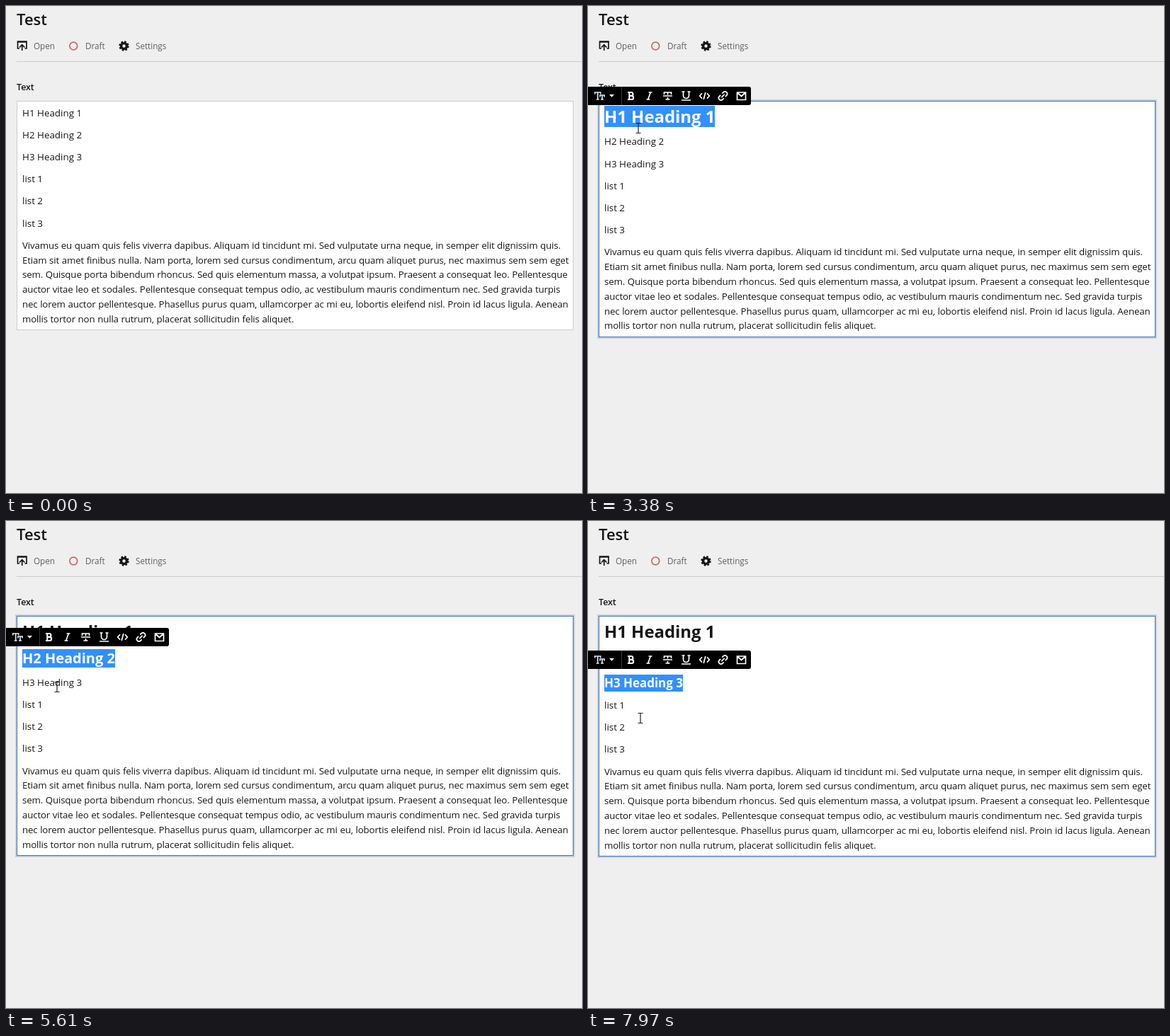
Write an HTML page that moves like this. It is 813x688 px and loops after 8000 ms.

```html
<!DOCTYPE html>
<html lang="en">
<head>
<meta charset="utf-8">
<title>Text editor</title>
<style>
html, body { margin: 0; width: 100%; height: 100%; overflow: hidden; background: #efefef; }
body { position: relative; color: #161616; font: 13.4px/20.8px "Open Sans", "Noto Sans", sans-serif; }
body > * { position: absolute; }
svg { display: block; overflow: visible; fill: none; stroke: #161616; stroke-width: 1.7; }
.title { left: 15px; top: 3px; font-size: 22px; line-height: 30px; font-weight: 600; }
.btn { top: 46px; font-size: 11.7px; color: #606060; }
.rule { left: 15px; right: 0; top: 78px; height: 1px; background: #ccc; }
.label { left: 15px; top: 105px; font-size: 12.4px; font-weight: 600; }
.box { left: 15px; top: 134px; width: 786px; box-sizing: border-box; padding: 5.7px 7px 4.7px; border: 1px solid #ccc; background: #fff; white-space: pre; }
.box.focus { border-color: #4271ae; box-shadow: 0 0 0 2px rgba(66, 113, 174, .25); }
.box div { margin-bottom: 10.4px; }
.box div span { display: inline-block; vertical-align: top; }
.box p { margin: 0; font-size: 13.3px; letter-spacing: -.15px; word-spacing: .33px; }
.h1 { font-size: 23.9px; line-height: 30.3px; font-weight: 700; }
.h2 { font-size: 20px; line-height: 26px; font-weight: 700; }
.h3 { font-size: 16.95px; line-height: 21.8px; font-weight: 700; }
.sel { background: #3390ff; color: #fff; }
.h3 .sel { margin: -1px 0; padding: 1px 0; }
.bar { left: 0; width: 230px; height: 26px; background: #000; border-radius: 0 3px 3px 0; }
.bar svg { stroke: #fff; }
.bar .solid { fill: #fff; stroke: none; }
.menu { left: 0; width: 110px; height: 135px; background: #fff; border-radius: 0 2px 2px 0; box-shadow: 0 2px 8px rgba(22, 22, 22, .13); }
.menu div { position: absolute; left: 33px; font-size: 11.7px; color: #666; }
.menu div.on { color: #111; }
.menu svg { position: absolute; left: -20px; top: 3px; }
.menu text { font-size: 5.5px; fill: #161616; stroke: none; }
</style>
</head>
<body>
<div class="title">Test</div>
<svg width="240" height="80" style="left:0;top:0">
  <path d="M19 60h-2.500V50H29v10h-2.500M16 51h13M22.700 63v-7M19 58.500l3.700-3.700 3.700 3.700"/>
  <circle cx="95.300" cy="56.500" r="5.400" stroke="#d16464"/>
  <circle cx="166.500" cy="56.500" r="4" stroke-width="3.600"/>
  <circle cx="166.500" cy="56.500" r="6.200" stroke-width="2" stroke-dasharray="2.600 2.270"/>
</svg>
<div class="btn" style="left:39px">Open</div>
<div class="btn" style="left:112px">Draft</div>
<div class="btn" style="left:183px">Settings</div>
<div class="rule"></div>
<div class="label">Text</div>

<div class="box" id="box"><div></div><div></div><div></div><div>list 1</div><div>list 2</div><div>list 3</div><p>Vivamus eu quam quis felis viverra dapibus. Aliquam id tincidunt mi. Sed vulputate urna neque, in semper elit dignissim quis.
Etiam sit amet finibus nulla. Nam porta, lorem sed cursus condimentum, arcu quam aliquet purus, nec maximus sem sem eget
sem. Quisque porta bibendum rhoncus. Sed quis elementum massa, a volutpat ipsum. Praesent a consequat leo. Pellentesque
auctor vitae leo et sodales. Pellentesque consequat tempus odio, ac vestibulum mauris condimentum nec. Sed gravida turpis
nec lorem auctor pellentesque. Phasellus purus quam, ullamcorper ac mi eu, lobortis eleifend nisl. Proin id lacus ligula. Aenean
mollis tortor non nulla rutrum, placerat sollicitudin felis aliquet.</p></div>

<div class="menu" id="menu"></div>

<div class="bar" id="bar">
  <svg width="230" height="26">
    <g id="wand">
      <path d="M10 19.500l7.500-7.500M18.500 11l1.500-1.500" stroke-width="2.400"/>
      <path d="M12 6.500v4M10 8.500h4M22 13v4M20 15h4M21 5.500v3M19.500 7h3" stroke-width="1.300"/>
    </g>
    <path id="style" stroke="#dbe6f2" transform="translate(9 6)"/>
    <path class="solid" d="M30 11h7l-3.500 3.700z"/>
    <path d="M47.500 0v26" stroke="#3a3a3a" stroke-width="1"/>
    <path d="M56 8h5a2.400 2.400 0 0 1 0 4.900H58M58.300 8v10M56 18h5.600a2.500 2.500 0 0 0 0-5.100H58" stroke-width="2.100"/>
    <path d="M85.500 8h5M82.500 18h5M88.300 8l-3.600 10"/>
    <path d="M107.500 11V8h10v3M112.500 8v3.500M112.500 15v3M109.500 18h6M106 13h13"/>
    <path d="M134.500 7v5.500a4 4 0 0 0 8 0V7M132.500 7h4M140.500 7h4M132 19h13"/>
    <path d="M161 9.300l-3.300 3.700 3.300 3.700M168 9.300l3.300 3.700-3.300 3.700M165.800 8l-2.600 10"/>
    <g transform="rotate(-45 190.500 13)">
      <path d="M189 9.800h-2.500a3.200 3.200 0 0 0 0 6.400h2.500M192 9.800h2.500a3.200 3.200 0 0 1 0 6.400h-2.500M187.500 13h6"/>
    </g>
    <path d="M210.500 8h12v10.500h-12zl6 5.500 6-5.500"/>
  </svg>
</div>

<svg id="mouse" width="1" height="1" style="left:0;top:0">
  <circle id="press" cx="-1.500" r="10" fill="#f7ea2c" fill-opacity=".65" stroke="none"/>
  <path id="arrow" d="M0 0v16l3.700-3.500 2.500 6 2.400-1-2.500-5.900h5.200z" fill="#fff" stroke="#000" stroke-width="1"/>
  <path id="beam" d="M-3.500-6.500h7M0-6.500v14M-3.500 7.500h7" stroke="#222" stroke-width="1.200"/>
  <path id="hand" d="M-1 10V1a1.500 1.500 0 0 1 3 0v5.500l7 1.500q1.500.5 1.500 2v3l-1.500 3v2H2v-2l-5.500-5.500q0-2 2.500-.5M5 7.500v2.500M7.500 8v2" fill="#fff" stroke="#000" stroke-width="1.100"/>
</svg>

<script>
const LOOP = 8000, ENTER = 70, ROW = 24.25, CHARS = 12;
const $ = id => document.getElementById(id);
const box = $('box'), bar = $('bar'), menu = $('menu');
const lines = [...box.querySelectorAll('div')].slice(0, 3);

// Icons
const tee = (x, y, w, h) => `M${x} ${y + 2.500}V${y}h${w}v2.500M${x + w / 2} ${y}v${h}m-2 0h4`;
const threeRows = draw => [2, 7, 12].map(draw).join('');
const title = `<path d="${tee(.7, 2, 8, 10)}${tee(8, 6, 6, 6)}"/>`;
const bullets = `<path d="${threeRows(y => `M5 ${y}h9`)}"/>`
  + `<path stroke-width="3" d="${threeRows(y => `M0 ${y}h3`)}"/>`;
const numbers = `<path d="${threeRows(y => `M5 ${y}h9`)}"/>`
  + threeRows((y, i) => `<text y="${y + 2}">${i + 1}</text>`);
$('style').setAttribute('d', tee(.7, 2, 8, 10) + tee(8, 6, 6, 6));

const entries = [['Heading 1', title], ['Heading 2', title], ['Heading 3', title], ['Bullet list', bullets], ['Ordered list', numbers]];
menu.innerHTML = entries.map(([name, icon], i) =>
  `<div style="top:${8.6 + ROW * i}px"><svg width="15" height="15">${icon}</svg>${name}</div>`).join('');
const items = [...menu.children];

// One pass per heading: drag over it, open the menu, go to the entry, apply the style.
const passes = [
  { drag: 500, leave: 2200, apply: 2900, entry: [44, 157] },
  { drag: 3520, leave: 4800, apply: 5540, entry: [72, 234] },
  { drag: 6020, leave: 7400, apply: 7800, entry: [74, 278] }
];
const DRAG = 600, RELEASE = 800, WAND = 1050, OPEN = 1150, APPROACH = 240, DESCEND = 300;

const progress = (t, from, time) => Math.max(0, Math.min(1, (t - from) / time));
const mix = (a, b, k) => a.map((v, i) => v + (b[i] - v) * k);
const easeOut = k => 1 - (1 - k) ** 4;
const show = (el, on) => { el.style.display = on ? '' : 'none'; };

// The toolbar keeps a fixed distance to the bottom of its line.
const barTop = i => Math.round(lines[i].getBoundingClientRect().bottom - 56.6);

function pointer(t) {
  const i = Math.max(0, passes.findLastIndex(p => t >= p.drag - APPROACH));
  const p = passes[i], since = t - p.drag;
  const rect = lines[i].getBoundingClientRect(), y = (rect.top + rect.bottom) / 2;
  const right = [109, y], left = [26, y], wand = [24, barTop(i) + 19];
  if (since < 0) {
    const rest = i ? passes[i - 1].entry : mix([330, 54], [111, 178], progress(t, ENTER, 190));
    return mix(rest, right, progress(since, -APPROACH, APPROACH));
  }
  if (since < RELEASE) return mix(right, left, progress(since, 0, DRAG));
  if (t < p.leave) return mix(left, wand, progress(since, RELEASE, WAND - RELEASE));
  return t < p.apply ? mix(wand, p.entry, easeOut(progress(t, p.leave, DESCEND))) : p.entry;
}

function render(t) {
  const now = passes.findLastIndex(p => t >= p.drag), cur = passes[now];
  const applied = !!cur && t >= cur.apply;
  const open = !!cur && t >= cur.drag + OPEN && !applied;
  const start = cur ? Math.ceil(CHARS * (1 - progress(t, cur.drag, DRAG))) : CHARS;
  const selecting = start < CHARS;

  box.classList.toggle('focus', !!cur);
  lines.forEach((line, i) => {
    const text = `H${i + 1} Heading ${i + 1}`, cut = i === now ? start : CHARS;
    line.className = t >= passes[i].apply ? 'h' + (i + 1) : '';
    line.innerHTML = text.slice(0, cut) + (cut < CHARS ? `<span class="sel">${text.slice(cut)}</span>` : '');
  });

  const top = cur ? barTop(now) : 0;
  const [x, y] = pointer(t);
  show(bar, selecting);
  show(menu, open);
  bar.style.top = top + 'px';
  menu.style.top = top + 33 + 'px';
  show($('wand'), !applied);
  show($('style'), applied);
  const row = Math.floor((y - top - 39.6) / ROW);
  items.forEach((el, i) => el.classList.toggle('on', i === row));

  const overBar = selecting && y >= top && y < top + 26;
  const overMenu = open && y >= top + 33;
  const kind = overBar || overMenu ? 'hand' : y > 134 ? 'beam' : 'arrow';
  for (const k of ['hand', 'beam', 'arrow']) show($(k), k === kind);
  show($('mouse'), t >= ENTER);
  $('mouse').style.transform = `translate(${Math.round(x)}px,${Math.round(y)}px)`;

  const since = cur ? t - cur.drag : -1;
  const dragging = since >= 0 && since < RELEASE;
  const opening = Math.abs(since - OPEN) < 80;
  const choosing = open && t > cur.apply - 150;
  show($('press'), dragging || opening || choosing);
}

const begin = performance.now();
function frame() {
  render((performance.now() - begin) % LOOP);
  requestAnimationFrame(frame);
}
frame();
</script>
</body>
</html>
```
